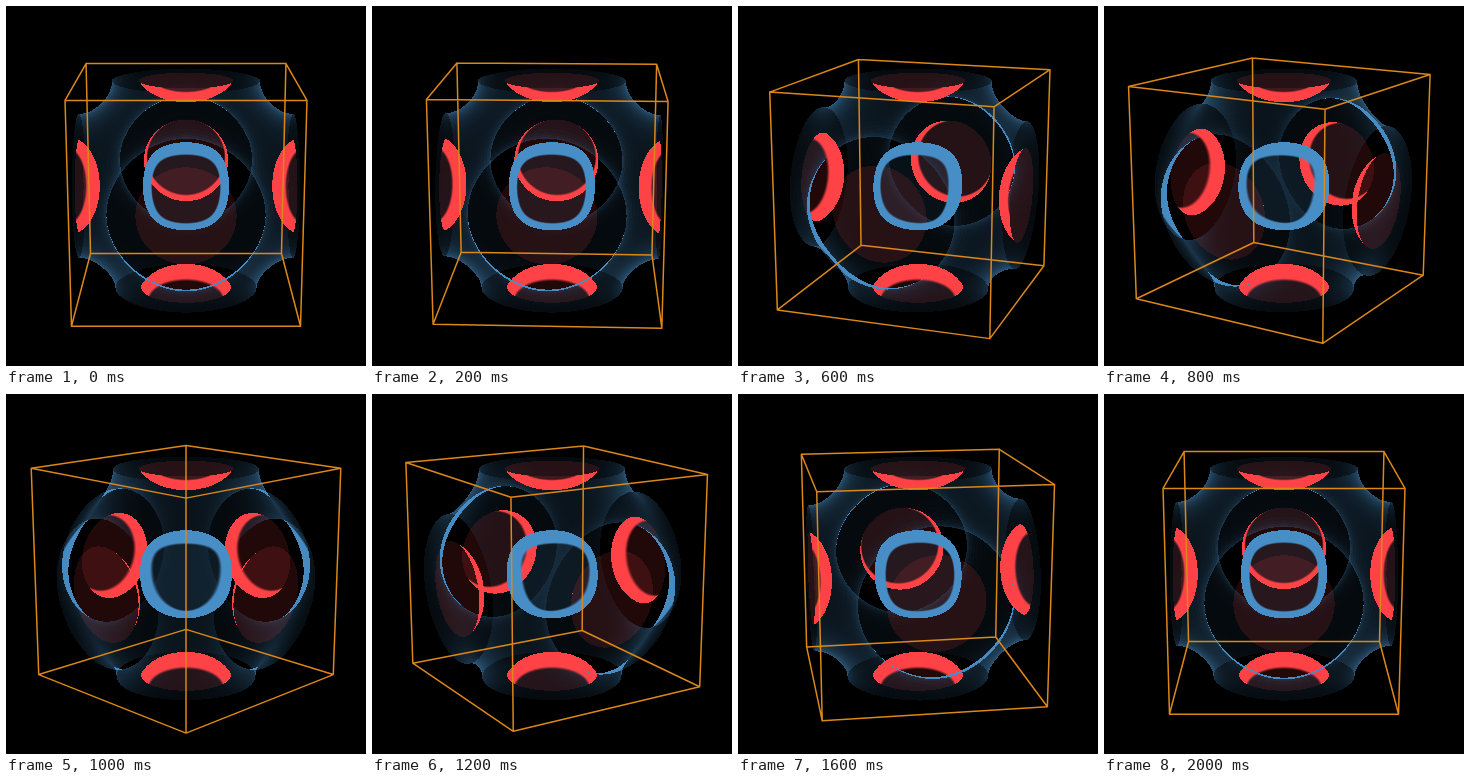
Animation, 360 px wide and 360 px high, one loop 2100 ms. Source, as an HTML page with a canvas:

```html
<!DOCTYPE html>
<html>
<head>
<meta charset="utf-8">
<style>
html, body { margin: 0; width: 100%; height: 100%; overflow: hidden; background: #000; }
canvas { display: block; width: 360px; height: 360px; }
</style>
</head>
<body>
<canvas id="stage" width="360" height="360"></canvas>
<script>
const SIZE = 360, MID = 180, FOCAL = 1110, DIST = 10.4, STEP = 0.04, TURN_STEPS = 20;
const TILT = Math.PI / 12, tc = Math.cos(TILT), ts = Math.sin(TILT);
const BLUE = [72, 142, 198], RED = [255, 66, 70];
const SQUARE = 2.7, FLAT = 2.5, CENTRE = 1.1; // ball squareness, dome flatness, dome centre
const ctx = document.getElementById('stage').getContext('2d');
const views = [];

function smooth(a, b, v) {
  const p = Math.min(1, Math.max(0, (v - a) / (b - a)));
  return p * p * (3 - 2 * p);
}

// Front-to-back stack of translucent layers
class Layers {
  reset() {
    this.rgb = [0, 0, 0];
    this.clear = 1;
  }
  add(colour, a) {
    a *= this.clear;
    for (let k = 0; k < 3; k++) this.rgb[k] += a * colour[k];
    this.clear -= a;
  }
}
const rims = new Layers(), veils = new Layers();

// How squarely a ray along d meets the ball or a dome at p: 0 grazing, 1 head-on
function facing(p, d, ball) {
  const sq = p.map(v => v * v), q = sq[0] + sq[1] + sq[2], top = Math.max(...sq);
  let dot = 0, len = 0;
  for (let k = 0; k < 3; k++) {
    let g = p[k];
    if (ball) g *= 1 - SQUARE * (q - sq[k]);
    else if (sq[k] === top) g = FLAT * (Math.abs(g) - CENTRE) * Math.sign(g);
    dot += g * d[k];
    len += g * g;
  }
  return Math.abs(dot) / Math.sqrt(len);
}

// Collects the layers along one ray from o along d, between t0 and t1
function trace(o, d, t0, t1) {
  const n = Math.max(2, Math.ceil((t1 - t0) / STEP)), h = (t1 - t0) / n;
  let x = o[0] + t0 * d[0], y = o[1] + t0 * d[1], z = o[2] + t0 * d[2];
  const dx = d[0] * h, dy = d[1] * h, dz = d[2] * h, PI = Math.PI;
  // Cosines advance by recurrence: c(k+1) = 2 cos(step) c(k) - c(k-1)
  const kx = 2 * Math.cos(PI * dx), ky = 2 * Math.cos(PI * dy), kz = 2 * Math.cos(PI * dz);
  let X = Math.cos(PI * x), Y = Math.cos(PI * y), Z = Math.cos(PI * z);
  let X0 = Math.cos(PI * (x - dx)), Y0 = Math.cos(PI * (y - dy)), Z0 = Math.cos(PI * (z - dz));
  let lastF = 0, lastE = 0, left = -9;
  rims.reset();
  veils.reset();

  for (let i = 0; i <= n; i++) {
    // Outer shell with six round openings
    const f = X + Y + Z + 0.35 * (X * Y + Y * Z + Z * X) + 0.875;
    // Rounded ball in the middle, shallow domes on the faces
    const xx = x * x, yy = y * y, zz = z * z, q = xx + yy + zz, ball = q < 0.3;
    const m = Math.max(Math.abs(x), Math.abs(y), Math.abs(z));
    const e = ball
      ? q - SQUARE * (xx * yy + yy * zz + zz * xx) - 0.1624
      : q - m * m + FLAT * (m - CENTRE) ** 2 - 0.21;

    if (f * lastF < 0) {
      const s = Math.min(1, Math.abs(f - lastF) / h / 3);
      const at = (i - f / (f - lastF)) * h;
      veils.add(BLUE, 0.07 + 0.35 * (1 - s) ** 2);
      // A ray that only just leaves the shell and returns shows a bright fold
      if (f < 0) left = at;
      else rims.add(BLUE, 0.95 * smooth(0.56, 0.48, at - left));
    }
    if (e * lastE < 0) {
      const back = e / (e - lastE);
      const s = facing([x - back * dx, y - back * dy, z - back * dz], d, ball);
      veils.add(ball ? BLUE : RED, ball ? 0.06 : 0.13);
      if (e < 0) rims.add(ball ? BLUE : RED, smooth(0.68, 0.6, s));
    }
    lastF = f;
    lastE = e;
    x += dx; y += dy; z += dz;
    let next = kx * X - X0; X0 = X; X = next;
    next = ky * Y - Y0; Y0 = Y; Y = next;
    next = kz * Z - Z0; Z0 = Z; Z = next;
  }
}

function drawBox(c, ca, sa) {
  const project = ([x, y, z]) => {
    const px = x * ca - z * sa, pz = x * sa + z * ca;
    const k = FOCAL / (DIST - pz * tc - y * ts);
    return [MID + px * k, MID - (y * tc - pz * ts) * k];
  };
  c.strokeStyle = '#dc8719';
  c.lineWidth = 1.5;
  c.lineCap = 'round';
  c.beginPath();
  for (let axis = 0; axis < 3; axis++)
    for (const u of [-1, 1])
      for (const v of [-1, 1]) {
        const p = [];
        p[(axis + 1) % 3] = u;
        p[(axis + 2) % 3] = v;
        p[axis] = -1;
        c.moveTo(...project(p));
        p[axis] = 1;
        c.lineTo(...project(p));
      }
  c.stroke();
}

function render(angle) {
  const canvas = document.createElement('canvas');
  canvas.width = canvas.height = SIZE;
  const c = canvas.getContext('2d'), image = c.createImageData(SIZE, SIZE), data = image.data;
  const ca = Math.cos(angle), sa = Math.sin(angle);
  const eye = [DIST * tc * sa, DIST * ts, DIST * tc * ca];
  for (let py = 0, at = 0; py < SIZE; py++)
    for (let px = 0; px < SIZE; px++, at += 4) {
      const u = (px + 0.5 - MID) / FOCAL, v = (MID - py - 0.5) / FOCAL;
      const vz = -v * ts - tc;
      const d = [u * ca + vz * sa, v * tc - ts, -u * sa + vz * ca];
      let t0 = 0, t1 = 99;
      for (let k = 0; k < 3; k++) {
        const inv = 1 / (d[k] || 1e-9), mid = -eye[k] * inv, half = Math.abs(inv);
        t0 = Math.max(t0, mid - half);
        t1 = Math.min(t1, mid + half);
      }
      data[at + 3] = 255;
      if (t1 - t0 < 0.001) continue;
      trace(eye, d, t0, t1);
      for (let k = 0; k < 3; k++) data[at + k] = rims.rgb[k] + rims.clear * veils.rgb[k];
    }
  c.putImageData(image, 0, 0);
  drawBox(c, ca, sa);
  return canvas;
}

let shown = -1;
function tick() {
  const step = Math.floor(performance.now() % 2100 / 100);
  if (step !== shown) {
    shown = step;
    // The second half of the quarter turn mirrors the first
    const k = Math.min(step, TURN_STEPS - step);
    views[k] = views[k] || render(smooth(0, TURN_STEPS, k) * Math.PI / 2);
    const flip = step > k;
    ctx.setTransform(flip ? -1 : 1, 0, 0, 1, flip ? SIZE : 0, 0);
    ctx.drawImage(views[k], 0, 0);
  }
  requestAnimationFrame(tick);
}
tick();
</script>
</body>
</html>
```
